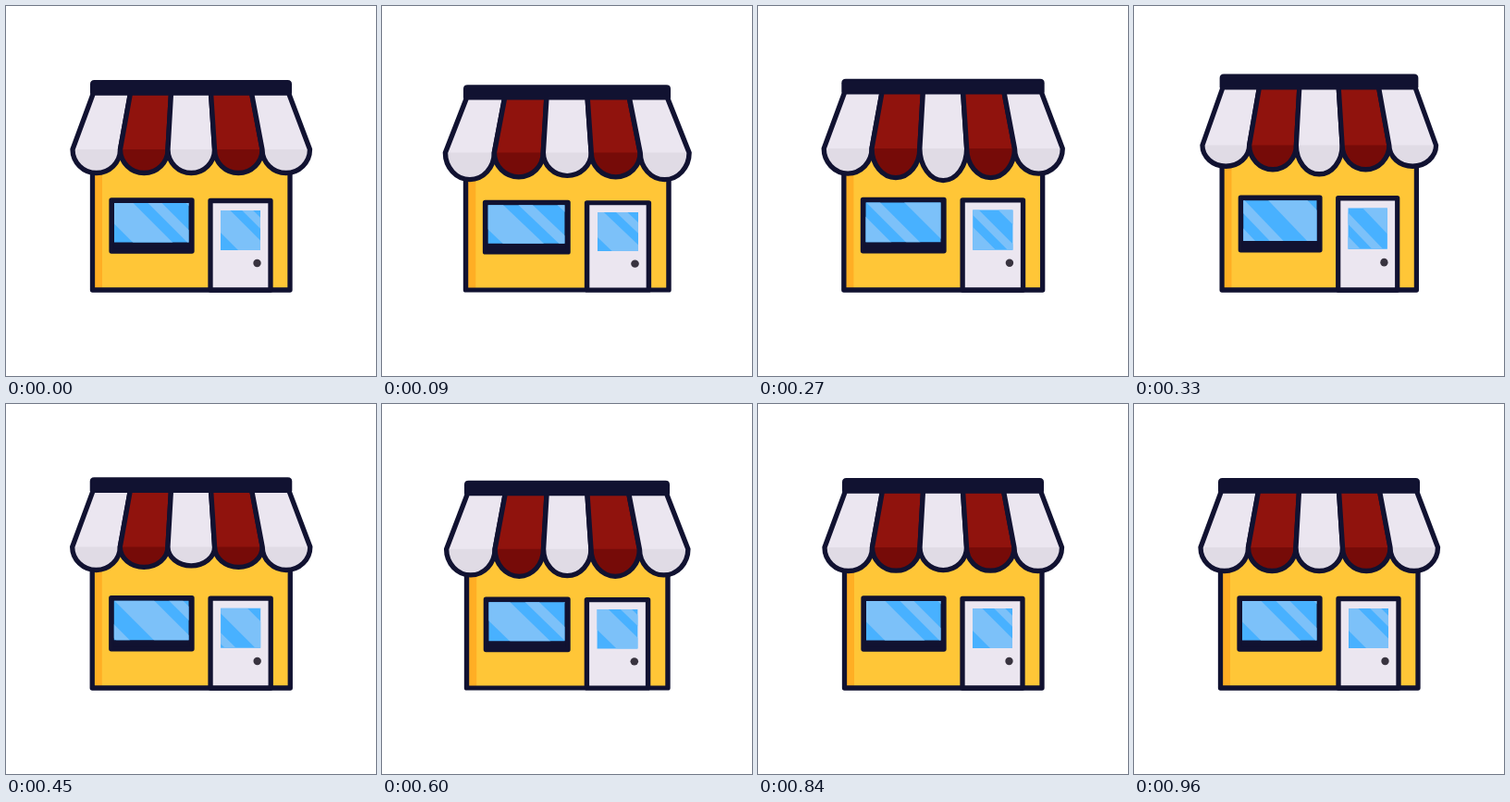
Recreate the animation shown at these times as an HTML page. Size 400 by 400 pixels, loop 2.02 s.

```html
<!DOCTYPE html>
<html lang="en">
<head>
<meta charset="utf-8">
<title>Bouncing shop</title>
<style>
  html, body { margin: 0; width: 100%; height: 100%; overflow: hidden; background: #fff; }
  svg { display: block; width: 100vw; height: 100vh; }
  .line { stroke: #111231; stroke-width: 5.3; stroke-linejoin: round; }
</style>
</head>
<body>
<svg viewBox="0 0 400 400">
  <defs>
    <clipPath id="paneClip"><rect x="117" y="213" width="80.500" height="42.500"/></clipPath>
    <clipPath id="doorClip"><rect x="232" y="221" width="43" height="43"/></clipPath>
  </defs>
  <g id="shop">
    <rect x="93.5" y="140" width="213.5" height="167" fill="#ffc637"/>
    <rect x="95" y="140" width="9" height="166" fill="#ffae24"/>
    <rect class="line" x="93.5" y="140" width="213.5" height="167" fill="none"/>

    <rect class="line" x="114" y="210" width="87" height="55" fill="#111231"/>
    <g clip-path="url(#paneClip)">
      <rect x="116" y="212" width="83" height="45" fill="#48b1ff"/>
      <path id="paneGlare" fill="#7cc1f9"/>
    </g>

    <rect class="line" x="221" y="210.5" width="65" height="96.5" fill="#ebe6f0"/>
    <g clip-path="url(#doorClip)">
      <rect x="231" y="220" width="45" height="45" fill="#48b1ff"/>
      <path id="doorGlare" fill="#7cc1f9"/>
    </g>
    <circle cx="271.5" cy="278" r="4.2" fill="#38333f"/>

    <g id="awning"></g>
    <path d="M91 94V84.500Q91 80 95.500 80H304.500Q309 80 309 84.500V94Q309 96 307 96H93Q91 96 91 94Z" fill="#111231"/>
  </g>
</svg>
<script>
const LOOP = 2020, STEP = 30, GROUND = 307, HEM = 155;
const SVG = 'http://www.w3.org/2000/svg';
const $ = id => document.getElementById(id);

// [time, value] pairs, joined with sine easing
const WIDTH = [[0, 1], [172, 1.052], [330, 0.985], [570, 1.02], [740, 1]];
const HEIGHT = [[0, 1], [172, 0.956], [330, 1.029], [545, 0.985], [740, 1]];
const SWING = [[0, 0], [170, 7.7], [365, -4.5], [545, 4], [720, -0.9], [840, 0]];
const GLARE = [[0, 0], [660, 100]];

function ease(keys, t) {
  if (t <= keys[0][0]) return keys[0][1];
  for (let i = 1; i < keys.length; i++) {
    const [t0, a] = keys[i - 1], [t1, b] = keys[i];
    if (t < t1) return a + (b - a) * (1 - Math.cos(Math.PI * (t - t0) / (t1 - t0))) / 2;
  }
  return keys[keys.length - 1][1];
}

const topX = [94.5, 134.5, 178.5, 221.5, 265.5, 305.5];
const hemX = [72, 123.5, 175, 225.5, 277, 328.5];
const white = ['#ebe6f0', '#e0dbe5'], red = ['#90130d', '#760b08'];

const panels = [0, 1, 2, 3, 4].map(i => {
  const colors = i % 2 ? red : white;
  const add = (fill, cls) => {
    const path = document.createElementNS(SVG, 'path');
    path.setAttribute('fill', fill);
    if (cls) path.setAttribute('class', cls);
    $('awning').append(path);
    return path;
  };
  const lag = 2 - Math.abs(i - 2);
  return { i, lag: lag * 45, gain: 1 + lag * 0.08,
    cloth: add(colors[0]), shade: add(colors[1]), edge: add('none', 'line') };
});

function drawPanel(p, t) {
  const l = hemX[p.i], r = hemX[p.i + 1];
  const drop = 25.5 + p.gain * ease(SWING, t - p.lag);
  const arc = `L${r} ${HEM}A${(r - l) / 2} ${drop} 0 0 1 ${l} ${HEM}Z`;
  const whole = `M${topX[p.i]} 94L${topX[p.i + 1]} 94${arc}`;
  p.cloth.setAttribute('d', whole);
  p.shade.setAttribute('d', `M${l} ${HEM}${arc}`);
  p.edge.setAttribute('d', whole);
}

// Wide and thin diagonal bands, repeating every 100 units
function glare(x, y, h, scale, shift) {
  let d = '';
  for (let n = -1; n < 3; n++) {
    for (const [start, width] of [[0, 43], [59, 15]]) {
      const a = x + (start + n * 100 - shift) * scale, w = width * scale;
      d += `M${a} ${y}h${w}l${h} ${h}h${-w}Z`;
    }
  }
  return d;
}

function draw(now) {
  const t = Math.floor((now % LOOP) / STEP) * STEP;
  const sx = ease(WIDTH, t), sy = ease(HEIGHT, t);
  $('shop').setAttribute('transform',
    `translate(200 ${GROUND}) scale(${sx} ${sy}) translate(-200 ${-GROUND})`);
  panels.forEach(p => drawPanel(p, t));
  const shift = ease(GLARE, t);
  $('paneGlare').setAttribute('d', glare(94, 212.5, 45, 1, shift));
  $('doorGlare').setAttribute('d', glare(208, 221, 43, 0.8, shift));
}

const begin = performance.now();
function tick() {
  draw(performance.now() - begin);
  requestAnimationFrame(tick);
}
tick();
</script>
</body>
</html>
```
